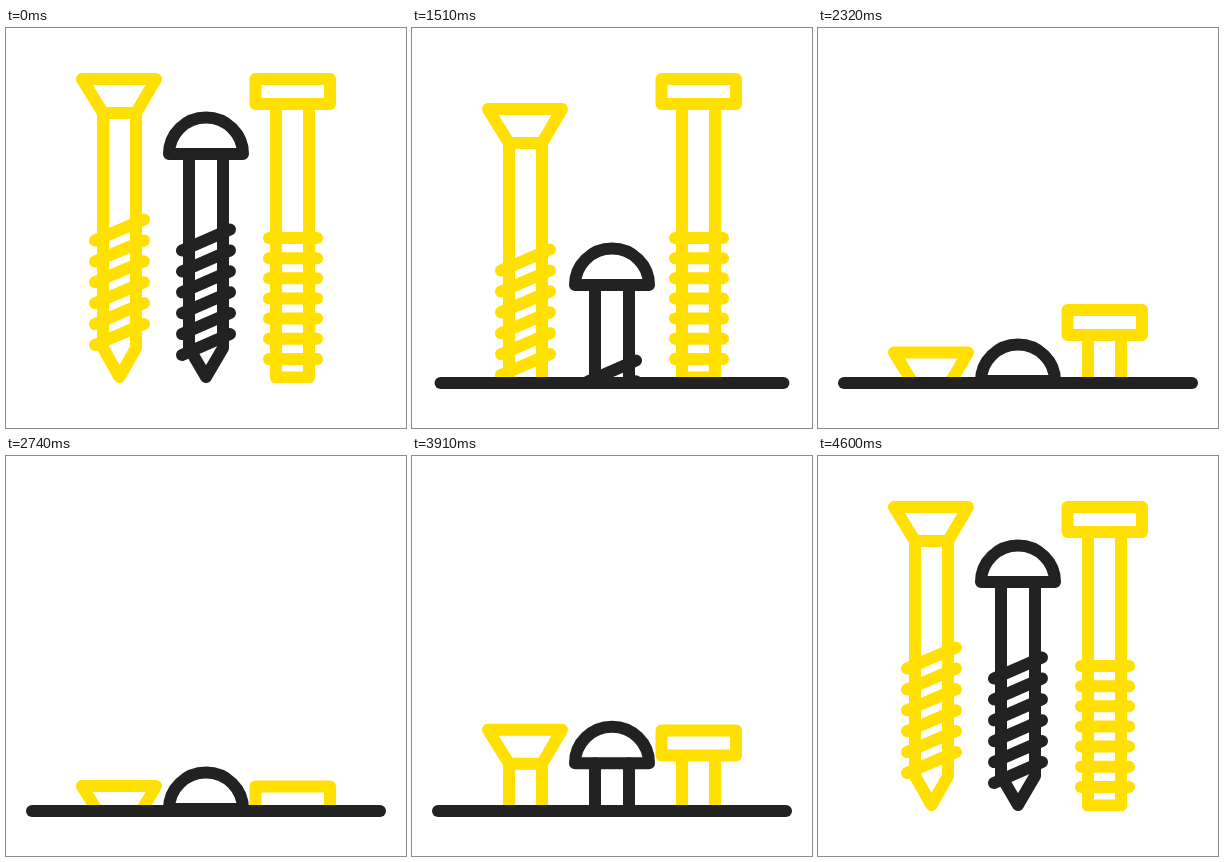
An HTML page with a canvas for the animation above (4660 ms loop, 400x400 px).

```html
<!DOCTYPE html>
<html lang="en">
<head>
<meta charset="utf-8">
<title>Screws</title>
<style>
  html, body { margin: 0; width: 100%; height: 100%; overflow: hidden; background: #fff; }
  canvas { display: block; width: 100vw; height: 100vh; }
</style>
</head>
<body>
<canvas id="stage" width="400" height="400"></canvas>
<script>
const ctx = document.getElementById('stage').getContext('2d');
const LOOP = 4660, STEP = 30;
const YELLOW = '#ffe000', DARK = '#222222';
const GROUND = 355, HALF_LINE = 174;

// Cubic bezier easing with flat ends, solved by bisection.
function ease(x1, x2) {
  return x => {
    if (x <= 0) return 0;
    if (x >= 1) return 1;
    let lo = 0, hi = 1;
    for (let i = 0; i < 30; i++) {
      const s = (lo + hi) / 2, r = 1 - s;
      if (3 * r * r * s * x1 + 3 * r * s * s * x2 + s * s * s < x) lo = s; else hi = s;
    }
    return lo * lo * (3 - 2 * lo);
  };
}
const sinkEase = ease(0.339, 0.353);
const lineEase = ease(0.23, 0.25);

// Eases in from a start time, then plays backwards to finish at 4600 ms.
function inAndOut(t, start, duration, curve) {
  return curve(Math.min(t - start, 4600 - t) / duration);
}

function poly(points, closed) {
  ctx.beginPath();
  points.forEach(([x, y]) => ctx.lineTo(x, y));
  if (closed) ctx.closePath();
  ctx.stroke();
}

function pointedShaft(x1, x2, top) {
  poly([[x1, top], [x1, 320], [(x1 + x2) / 2, 349], [x2, 320], [x2, top]]);
}

function threads(count, x1, y1, x2, y2, gap) {
  for (let i = 0; i < count; i++) poly([[x1, y1 + i * gap], [x2, y2 + i * gap]]);
}

function flatScrew() {
  poly([[76, 51], [150, 51], [130, 85], [97, 85]], true);
  pointedShaft(97, 130, 85);
  threads(6, 89, 212.5, 138, 191.5, 20.9);
}

function domeScrew() {
  ctx.beginPath();
  ctx.ellipse(200, 126, 37, 36.5, 0, Math.PI, 2 * Math.PI);
  ctx.closePath();
  ctx.stroke();
  pointedShaft(183, 217, 126);
  threads(6, 176, 222.5, 224, 201.5, 20.9);
}

function bolt() {
  poly([[249.5, 51], [324, 51], [324, 76], [249.5, 76]], true);
  poly([[270, 76], [270, 349.5], [303, 349.5], [303, 76]]);
  threads(7, 263, 210, 311, 210, 20.15);
}

const parts = [
  { draw: flatScrew, color: YELLOW, start: 1300, depth: 279 },
  { draw: bolt, color: YELLOW, start: 1600, depth: 280 },
  { draw: domeScrew, color: DARK, start: 1000, depth: 227 }
];

function render(t) {
  ctx.fillStyle = '#fff';
  ctx.fillRect(0, 0, 400, 400);
  ctx.lineWidth = 12;
  ctx.lineCap = ctx.lineJoin = 'round';

  ctx.save();
  ctx.beginPath();
  ctx.rect(0, 0, 400, GROUND);
  ctx.clip();
  for (const { draw, color, start, depth } of parts) {
    ctx.save();
    ctx.translate(0, depth * inAndOut(t, start, 1200, sinkEase));
    ctx.strokeStyle = color;
    draw();
    ctx.restore();
  }
  ctx.restore();

  const half = HALF_LINE * inAndOut(t, 1000, 600, lineEase);
  if (half > 0) {
    ctx.strokeStyle = DARK;
    poly([[200 - half, GROUND], [200 + half, GROUND]]);
  }
}

const begin = performance.now();
function tick() {
  const t = (performance.now() - begin) % LOOP;
  render(10 + STEP * Math.floor((t - 10) / STEP));
  requestAnimationFrame(tick);
}
tick();
</script>
</body>
</html>
```
